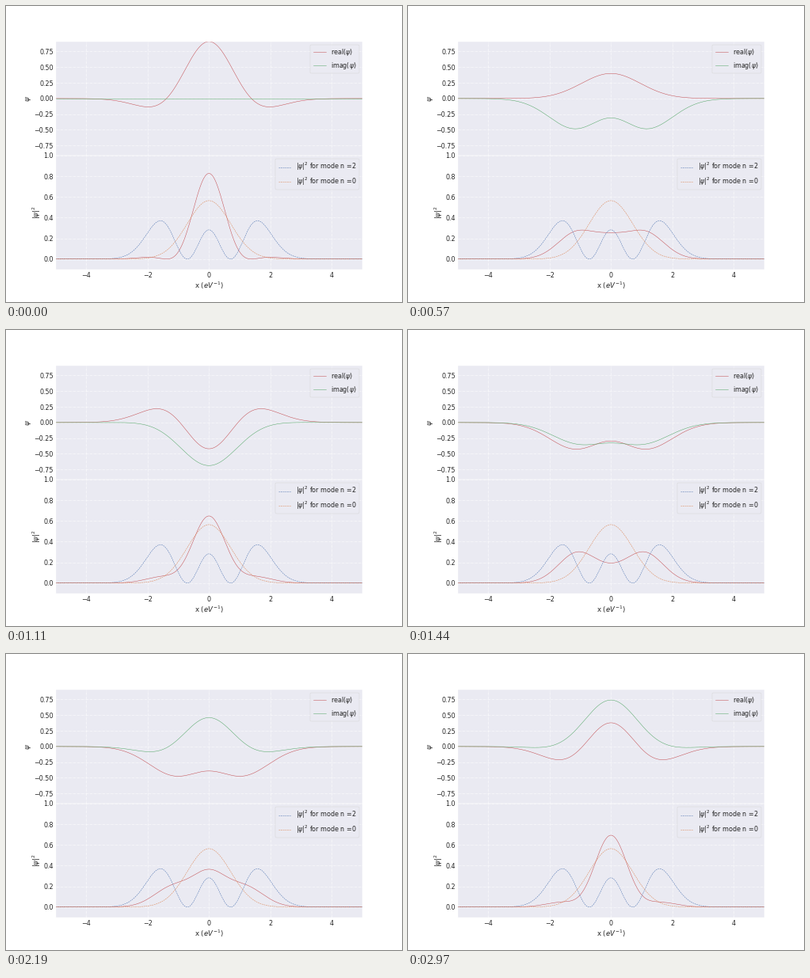
Recreate the animation shown at these times as a matplotlib script. Size 500 by 374 pixels, loop 3000 ms.

```python
import numpy as np
import matplotlib.pyplot as plt
from matplotlib.animation import FuncAnimation

FRAMES, INTERVAL, DT = 100, 30, 0.1
DPI = 100
PX = 72 / DPI  # one pixel in points
RED, GREEN, BLUE, ORANGE = "#C44E52", "#55A868", "#4C72B0", "#DD8452"
PANEL, INK = "#EAEAF2", "#262626"

plt.rcParams.update({
    "font.family": "DejaVu Sans",
    "text.color": INK,
    "axes.labelcolor": INK,
    "axes.labelsize": 8.6 * PX,
    "axes.labelpad": 1.8 * PX,
    "axes.facecolor": PANEL,
    "axes.edgecolor": "white",
    "axes.linewidth": 0.4 * PX,
    "axes.axisbelow": True,
    "xtick.color": INK,
    "ytick.color": INK,
    "xtick.labelsize": 8 * PX,
    "ytick.labelsize": 8 * PX,
    "xtick.major.pad": 3.3 * PX,
    "ytick.major.pad": 2.5 * PX,
    "legend.fontsize": 8 * PX,
    "lines.linewidth": 0.5 * PX,
})

x = np.linspace(-5, 5, 1000)
phi0 = np.pi ** -0.25 * np.exp(-x**2 / 2)
phi2 = phi0 * (2 * x**2 - 1) / np.sqrt(2)


def wave(t):
    """Superposition of oscillator modes 0 and 2 (energies 1/2 and 5/2)."""
    return (2 * phi0 * np.exp(-0.5j * t) - phi2 * np.exp(-2.5j * t)) / np.sqrt(5)


fig, (top, low) = plt.subplots(2, 1, sharex=True, figsize=(5, 3.74), dpi=DPI)
fig.subplots_adjust(left=0.125, right=0.9, bottom=0.11, top=0.88, hspace=0)

for ax in (top, low):
    ax.grid(color="white", lw=0.5 * PX, ls="-.")
    ax.tick_params(length=0)

peak = abs(wave(0)).max()
top.set(xlim=(-5, 5), ylim=(-peak, peak), yticks=np.arange(-0.75, 0.8, 0.25),
        ylabel=r"$\psi$")
low.set(ylim=(-0.1, 1), yticks=np.arange(0, 1.1, 0.2), xticks=range(-4, 5, 2),
        xlabel=r"x ($eV^{-1}$)", ylabel=r"$|\psi|^2$")

real, = top.plot(x, phi0, color=RED, label=r"real($\psi$)")
imag, = top.plot(x, phi0, color=GREEN, label=r"imag($\psi$)")
density, = low.plot(x, phi0, color=RED)
for n, phi, color in ((2, phi2, BLUE), (0, phi0, ORANGE)):
    low.plot(x, phi**2, "--", color=color, label=rf"$|\psi|^2$ for mode n ={n}")

for ax in (top, low):
    legend = ax.legend(loc="upper right", facecolor=PANEL, edgecolor="#CCCCCC")
    legend.get_frame().set_linewidth(0.4 * PX)


def update(frame):
    psi = wave(frame * DT)
    real.set_ydata(psi.real)
    imag.set_ydata(psi.imag)
    density.set_ydata(abs(psi) ** 2)
    return real, imag, density


anim = FuncAnimation(fig, update, frames=FRAMES, interval=INTERVAL,
                     repeat=True, repeat_delay=0)
plt.show()
```
